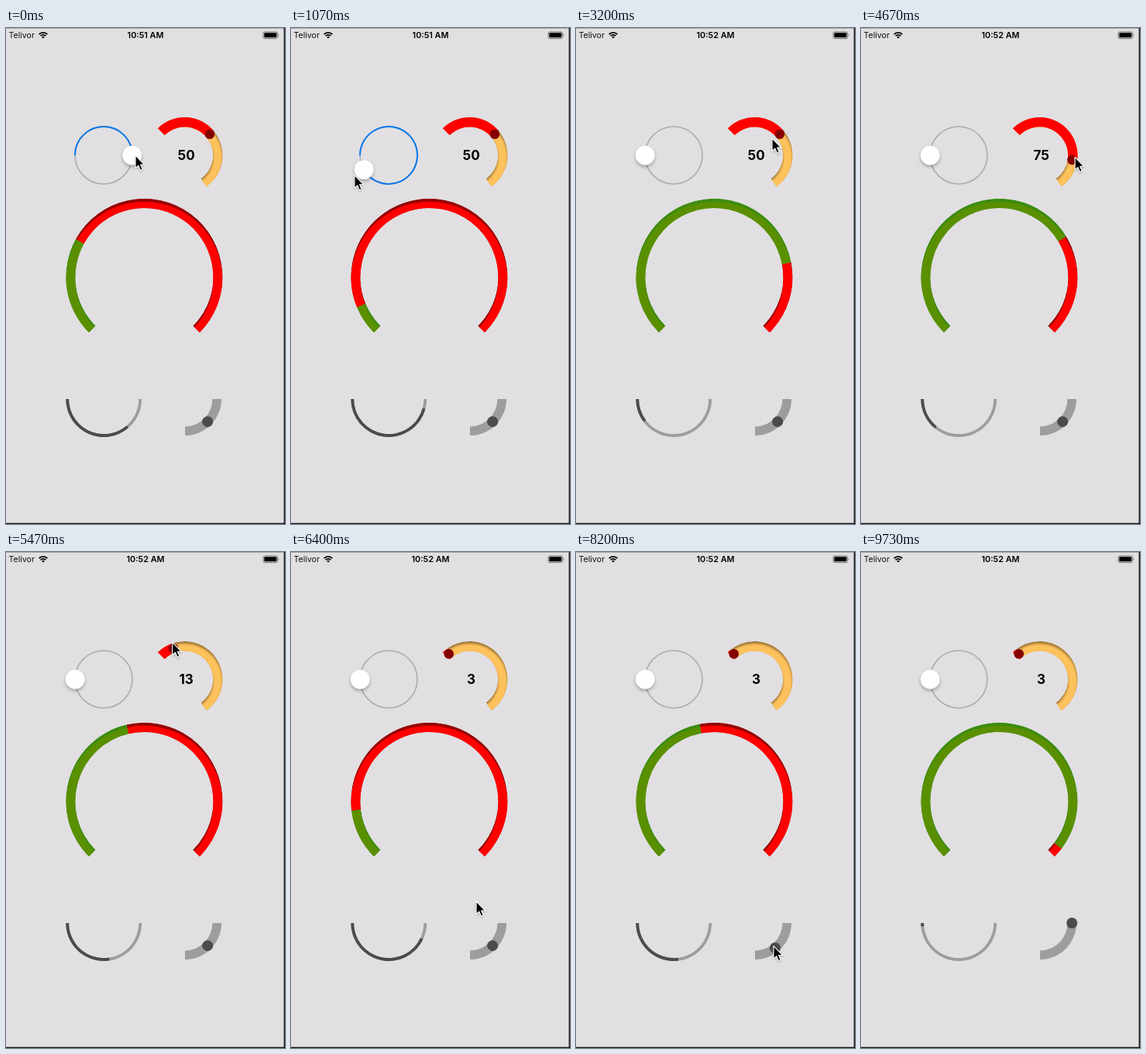
An HTML page for the animation above (9790 ms loop, 360x639 px).

```html
<!DOCTYPE html>
<html lang="en">
<head>
<meta charset="utf-8">
<title>Circular sliders</title>
<style>
html, body { margin: 0; width: 100%; height: 100%; overflow: hidden; background: #e1dfe1; }
svg { display: block; width: 100%; height: 100%; }
text { font-family: Inter, "Liberation Sans", sans-serif; }
</style>
</head>
<body>
<svg viewBox="0 0 360 639">
  <defs>
    <filter id="soft" x="-20%" y="-20%" width="140%" height="140%"><feGaussianBlur stdDeviation=".7"/></filter>
    <filter id="softer" x="-20%" y="-20%" width="140%" height="140%"><feGaussianBlur stdDeviation="1.8"/></filter>
    <filter id="drop" x="-50%" y="-50%" width="200%" height="200%">
      <feDropShadow dx="0" dy="2.5" stdDeviation="2" flood-color="#000" flood-opacity=".3"/>
    </filter>
    <filter id="tipShade" x="-50%" y="-50%" width="200%" height="200%">
      <feDropShadow dx="0" dy="1" stdDeviation=".8" flood-color="#000" flood-opacity=".35"/>
    </filter>
    <clipPath id="greenClip"><path id="greenCut"/></clipPath>
    <clipPath id="redClip"><path id="redCut"/></clipPath>
    <clipPath id="goldClip"><path id="goldCut"/></clipPath>
  </defs>

  <rect width="360" height="639" fill="#e1dfe1"/>

  <!-- status bar -->
  <text x="3.5" y="13.3" font-size="10.6" fill="#111">Telivor</text>
  <g fill="none" stroke="#000" stroke-width="1.7">
    <path d="M42.6 8.1A7.6 7.6 0 0 1 53.4 8.1M44.6 10.2A4.8 4.8 0 0 1 51.4 10.2"/>
    <path d="M48 13.6L46.2 11.7A2.6 2.6 0 0 1 49.8 11.7Z" fill="#000" stroke="none"/>
  </g>
  <text id="clock" x="180" y="13.3" font-size="10.8" font-weight="600" fill="#000" text-anchor="middle"></text>
  <rect x="331.9" y="5" width="18.6" height="8.6" rx="2" fill="none" stroke="#555" stroke-width=".8"/>
  <rect x="333.2" y="6.3" width="16" height="6" rx="1" fill="#000"/>
  <path d="M351.6 7.8Q353.2 9.3 351.6 10.8Z" fill="#555"/>

  <!-- ring slider -->
  <circle cx="126" cy="164" r="37" fill="none" stroke="#aeacaf" stroke-width="1.6"/>
  <path id="blue" fill="none" stroke="#0b78ea" stroke-width="2"/>
  <circle id="whiteKnob" r="12.3" fill="#fff" filter="url(#drop)"/>

  <!-- numbered slider -->
  <g clip-path="url(#goldClip)">
    <path id="goldDark" fill="#9c7535"/>
    <path id="goldFill" fill="#fec25c" transform="translate(0 3)" filter="url(#softer)"/>
  </g>
  <path id="scarlet" fill="#f00"/>
  <circle id="darkKnob" r="6.3" fill="#850000"/>
  <text id="num" x="232.6" y="169.6" font-size="17" font-weight="700" text-anchor="middle"></text>

  <!-- large gauge -->
  <g clip-path="url(#redClip)">
    <path class="gauge" fill="#960000"/>
    <path class="gauge" fill="#f00" transform="translate(0 4)" filter="url(#soft)"/>
  </g>
  <g clip-path="url(#greenClip)">
    <path class="gauge" fill="#3b8c10"/>
    <path class="gauge" fill="#5a9000" transform="translate(0 4)" filter="url(#soft)"/>
  </g>

  <!-- lower row -->
  <path id="halfTrack" fill="#9d9c9e"/>
  <path id="halfFill" fill="#4b4a4c"/>
  <path id="quarter" fill="#9d9c9e"/>
  <circle id="greyKnob" r="7" fill="#4b4a4c"/>

  <!-- frame edges -->
  <path d="M359.2 0V639M0 638.5H360" stroke="#111" stroke-width="1.4"/>
  <path d="M0 .2H360" stroke="#333" stroke-width=".5"/>

  <path id="cursor" d="M0 0V16.6L3.8 13.1L6.4 19.2L9.2 18L6.6 12H11.7Z" fill="#000" stroke="#fff"
    stroke-width="1.1" stroke-linejoin="round" filter="url(#tipShade)"/>
</svg>
<script>
const LOOP = 9790, STEP = 1000 / 15;
const $ = id => document.getElementById(id);
const set = (id, attrs) => { for (const k in attrs) $(id).setAttribute(k, attrs[k]); };

const at = (c, r, deg) => {
  const a = deg * Math.PI / 180;
  return [c[0] + r * Math.cos(a), c[1] + r * Math.sin(a)];
};

// Clockwise arc, angles in degrees from the right
function arc(c, r, a0, a1) {
  a1 = Math.min(a1, a0 + 359.9);
  return `M${at(c, r, a0)}A${r} ${r} 0 ${a1 - a0 > 180 ? 1 : 0} 1 ${at(c, r, a1)}`;
}

function band(c, r, w, a0, a1) {
  if (a1 - a0 < .01) return "";
  const out = r + w / 2, inn = r - w / 2, big = a1 - a0 > 180 ? 1 : 0;
  return arc(c, out, a0, a1) + `L${at(c, inn, a1)}A${inn} ${inn} 0 ${big} 0 ${at(c, inn, a0)}Z`;
}

// Piecewise interpolation through rows of [time, ...values]
function track(rows, t, ease = x => x) {
  if (t <= rows[0][0]) return rows[0].slice(1);
  for (let i = 1; i < rows.length; i++) {
    const a = rows[i - 1], b = rows[i];
    if (t < b[0]) {
      const k = ease((t - a[0]) / (b[0] - a[0]));
      return a.slice(1).map((v, j) => v + (b[j + 1] - v) * k);
    }
  }
  return rows[rows.length - 1].slice(1);
}
const smooth = x => x * x * (3 - 2 * x);

const RING = [126, 164], DIAL = [230.5, 164], GAUGE = [178.4, 320.8],
      HALF = [126.2, 478], QUART = [231, 478];

// [time, slider value, pointer distance from the centre]
const ringKeys = [[0, 0 + 180, 41], [.8, 360, 60], [.86, 360, 60], [1.04, 338, 51],
                  [1.6, 165, 52], [2.13, 41, 53], [2.5, 0, 50]];
const dialKeys = [[3.45, 50, 43], [4.05, 100, 43], [4.3, 100, 45], [4.67, 75, 46],
                  [5.2, 28, 47], [5.65, 3, 46]];
const quartKeys = [[6.95, 45, 39], [7.6, 90, 43], [8.05, 90, 43], [8.2, 51, 38], [8.65, 0, 53]];
const dialAngle = v => 225 + 1.9 * v;

// Free pointer moves between the drags
const toDial = [[2.6, 76, 164], [3.2, 253, 142], [3.45, 263, 132]];
const toQuart = [[5.95, 200, 127], [6.4, 239, 450], [6.95, 258.6, 505.6]];
const leave = [[9.1, 284, 478], [9.7, -24, 420]];

function pointer(t, ring, dial, quart) {
  if (t < 2.6) return at(RING, ring[1], 180 + ring[0]);
  if (t < 3.45) return track(toDial, t, smooth);
  if (t < 5.95) {
    const p = at(DIAL, dial[1], dialAngle(dial[0]));
    return [p[0], p[1] - 4];
  }
  if (t < 6.95) return track(toQuart, t, smooth);
  if (t < 9.1) return at(QUART, quart[1], quart[0]);
  return track(leave, t, smooth);
}

function place(id, p) { set(id, { cx: p[0], cy: p[1] }); }

function draw(t) {
  // Triangle wave, three seconds each way
  const p = (t + 5.18) % 6, v = p < 3 ? p / 3 : 2 - p / 3;
  const edge = 135 + 270 * v;
  set("greenCut", { d: band(GAUGE, 95, 12.2, 135, edge) });
  set("redCut", { d: band(GAUGE, 95, 12.2, edge, 405) });
  set("halfFill", { d: band(HALF, 47, 3.8, 180 - 180 * (1 - v), 180) });

  const ring = track(ringKeys, t), dial = track(dialKeys, t), quart = track(quartKeys, t);
  set("blue", { d: ring[0] > .1 ? arc(RING, 37, 180, 180 + ring[0]) : "" });
  place("whiteKnob", at(RING, 36.8, 180 + ring[0]));

  const a = dialAngle(dial[0]);
  set("scarlet", { d: band(DIAL, 42.8, 12.4, 225, a) });
  place("darkKnob", at(DIAL, 42.3, a));
  $("num").textContent = Math.round(dial[0]);

  place("greyKnob", at(QUART, 41.2, quart[0]));
  $("clock").textContent = t < 2.6 ? "10:51 AM" : "10:52 AM";
  set("cursor", { transform: `translate(${pointer(t, ring, dial, quart)})` });
}

document.querySelectorAll(".gauge").forEach(e => e.setAttribute("d", band(GAUGE, 95, 12.2, 125, 415)));
set("goldCut", { d: band(DIAL, 42.8, 12.4, 225, 415) });
set("goldDark", { d: band(DIAL, 42.8, 12.4, 225, 415) });
set("goldFill", { d: band(DIAL, 42.8, 12.4, 210, 430) });
set("halfTrack", { d: band(HALF, 47, 3.8, 0, 180) });
set("quarter", { d: band(QUART, 41.2, 11.6, 0, 90) });

function tick() {
  const ms = Math.floor(performance.now() % LOOP / 10) * 10;
  draw(Math.floor((ms + 5) / STEP) / 15);
  requestAnimationFrame(tick);
}
tick();
</script>
</body>
</html>
```
